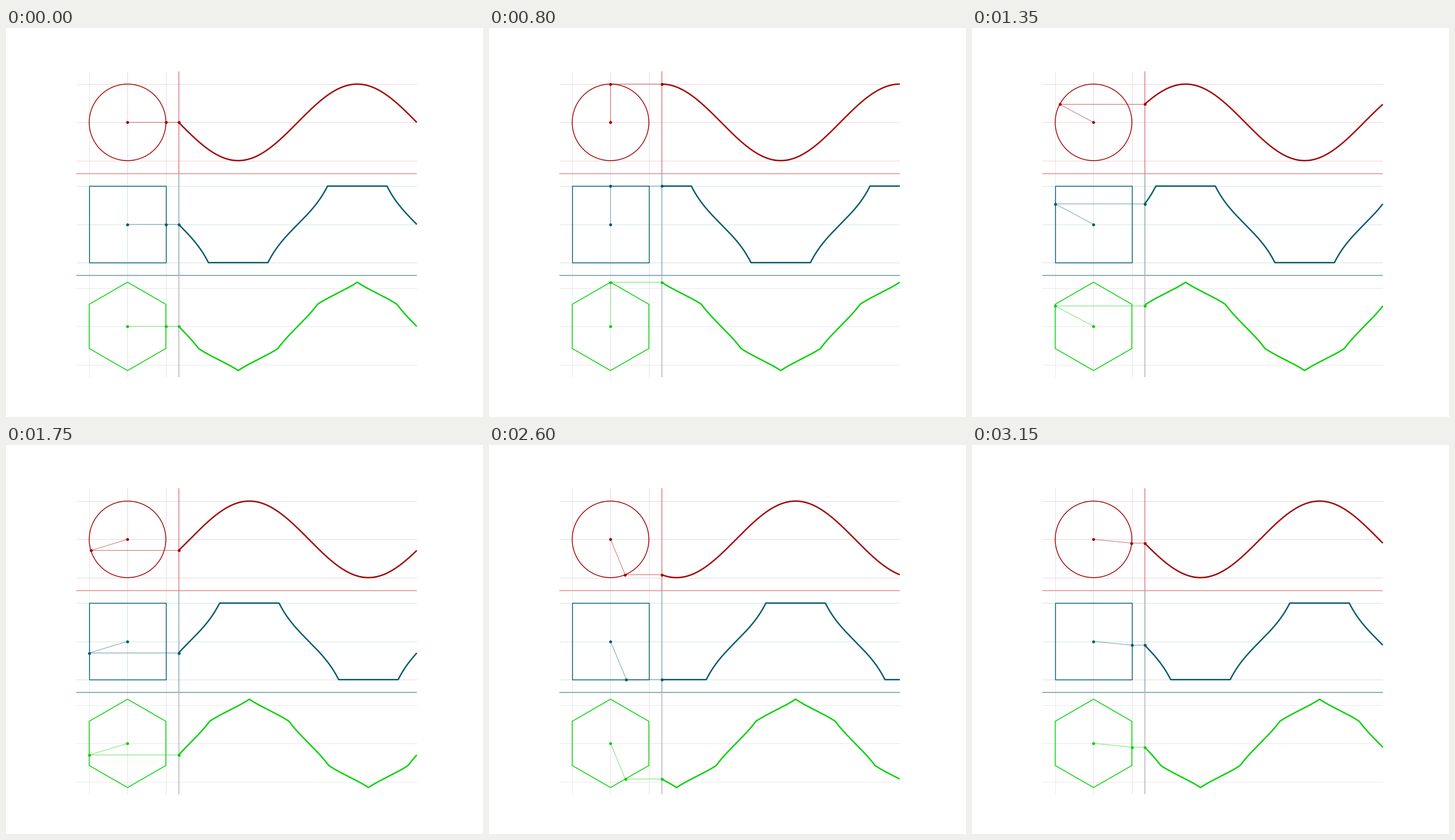
Write a matplotlib script that moves like this. It is 814 px wide and 665 px high and loops after 3200 ms.

```python
import numpy as np
import matplotlib.pyplot as plt
from matplotlib.animation import FuncAnimation

W, H, DPI = 814, 665, 100
PX = 72 / DPI
FRAMES, INTERVAL = 64, 50
UNIT = 21.8
R = 3 * UNIT
CX, CY, ROW = 207.4, 161.3, 8 * UNIT
LEFT, AXIS, RIGHT = CX - 4 * UNIT, CX + 4 * UNIT, 701
TURN = 2 * np.pi

# sides (0 = circle), main colour, horizontal grid, vertical grid, axis
ROWS = [
    (0, "#a00000", "#f3d3d7", ("#f6dde0", "#eed3d7", "#eed9dc"), "#e3888e"),
    (4, "#005a69", "#d5e6e6", ("#e6ebeb", "#d2e5e5", "#dfe4e4"), "#8fb2bf"),
    (6, "#00d000", "#e9e9e9", ("#ebebeb", "#e4e4e4", "#e4e4e4"), "#bcbcc0"),
]
SEPARATORS = ["#e2969c", "#709fac"]

fig = plt.figure(figsize=(W / DPI, H / DPI), dpi=DPI, facecolor="white")
ax = fig.add_axes([0, 0, 1, 1])
ax.set(xlim=(0, W), ylim=(H, 0))
ax.axis("off")


def radius(angle, sides):
    """Distance from the centre to the outline, with a flat side at angle 0."""
    if not sides:
        return R + 0 * angle
    half = np.pi / sides
    return R / np.cos((angle + half) % (2 * half) - half)


def outline(angle, sides):
    r = radius(angle, sides)
    return r * np.cos(angle), -r * np.sin(angle)


def line(x, y, color, width, z, **kw):
    kw.setdefault("solid_capstyle", "butt")
    return ax.plot(x, y, color=color, lw=width * PX, zorder=z, **kw)[0]


class Tracer:
    """One shape, its rotating arm and the wave it draws."""

    def __init__(self, row, sides, color, grid, verticals, axis):
        self.sides = sides
        self.cy = cy = CY + row * ROW
        top, bottom = cy - 4 * UNIT, cy + 4 * UNIT
        for k in (-1, 0, 1):
            last = row > 0 and k == 1
            line([LEFT, RIGHT], [cy + k * R] * 2, "#dcdfe0" if last and row == 1 else grid, 1, 1)
            line([CX + k * R] * 2, [top, bottom], verticals[k + 1], 1, 1)
        line([AXIS] * 2, [top, bottom], axis, 1.6, 3)

        if sides:
            a = (np.arange(sides + 1) + 0.5) * TURN / sides
        else:
            a = np.linspace(0, TURN, 361)
        x, y = outline(a, sides)
        line(CX + x, cy + y, color, 1.4, 4, solid_joinstyle="miter")

        self.x = np.linspace(AXIS, RIGHT, 721)
        self.phase = np.linspace(0, TURN, 721)
        self.arm = line([], [], color, 1.1, 5, alpha=0.5, snap=False)
        self.level = line([], [], color, 1.1, 5, alpha=0.55, snap=False)
        self.wave = line([], [], color, 2.4, 6, solid_joinstyle="round")
        self.dots = ax.plot([], [], "o", color=color, ms=5 * PX, mew=0, zorder=7)[0]

    def update(self, angle):
        dx, dy = outline(angle, self.sides)
        x, y = CX + dx, self.cy + dy
        self.arm.set_data([CX, x], [self.cy, y])
        self.level.set_data([x, AXIS], [y, y])
        self.wave.set_data(self.x, self.cy + outline(angle - self.phase, self.sides)[1])
        self.dots.set_data([CX, x, AXIS], [self.cy, y, y])
        return self.arm, self.level, self.wave, self.dots


tracers = [Tracer(i, *spec) for i, spec in enumerate(ROWS)]
for i, color in enumerate(SEPARATORS):
    line([LEFT, RIGHT], [CY + (i + 0.5) * ROW] * 2, color, 1.6, 2)


def update(frame):
    angle = TURN * frame / FRAMES
    return [artist for t in tracers for artist in t.update(angle)]


anim = FuncAnimation(fig, update, frames=FRAMES, interval=INTERVAL,
                     repeat=True, repeat_delay=0, blit=False)
plt.show()
```
